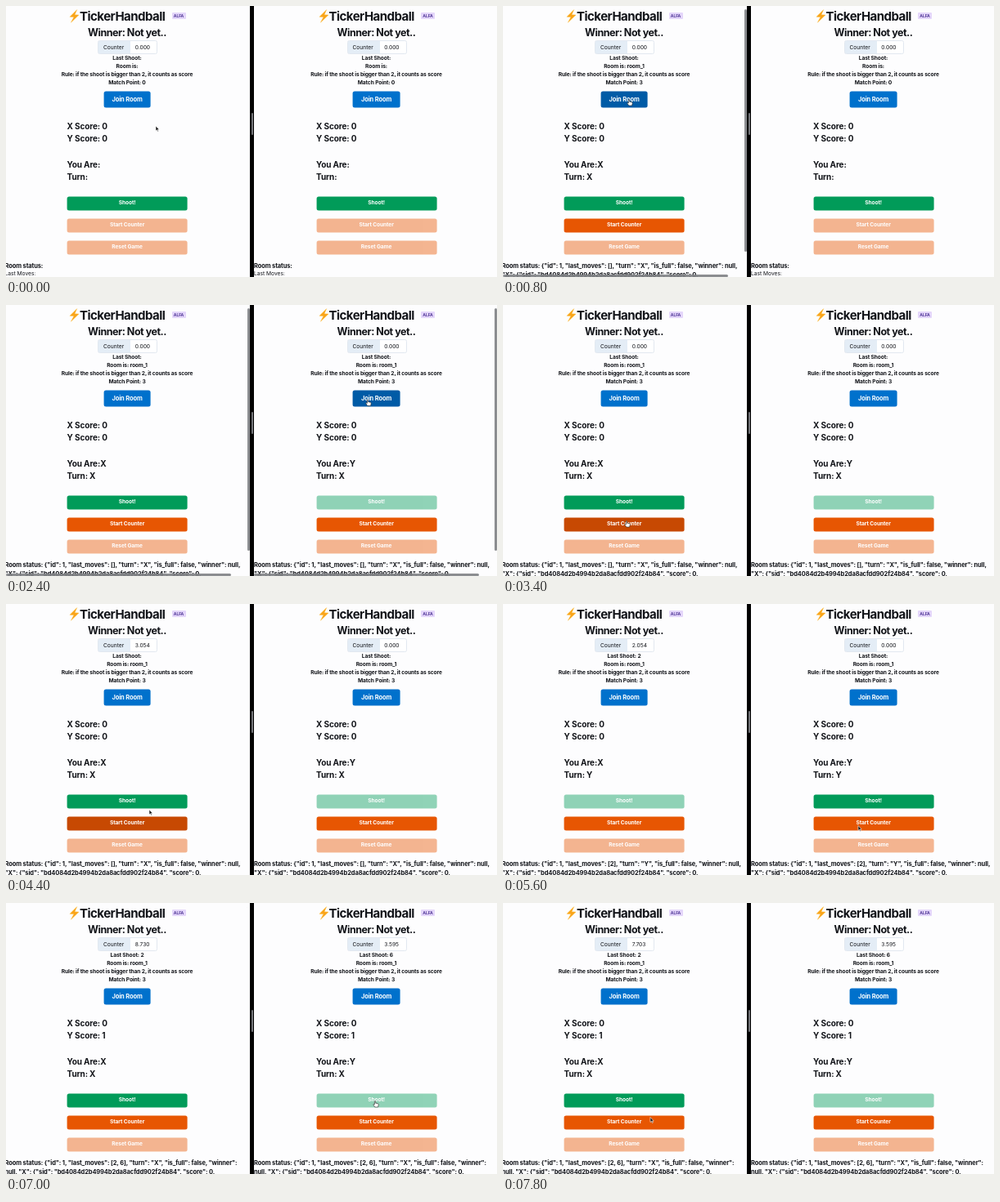
Write an HTML page that moves like this. It is 600 px wide and 332 px high and loops after 8000 ms.

```html
<!DOCTYPE html>
<html lang="en">
<head>
<meta charset="utf-8">
<title>Two-player counter game</title>
<style>
  html, body { margin: 0; width: 100%; height: 100%; overflow: hidden; }
  body { position: relative; background: #000; color: #121419; font: 700 6.667px/10px Inter, sans-serif; letter-spacing: -.018em; }
  .panel { position: absolute; top: 0; height: 332px; overflow: hidden; background: #fdfdfe; }
  .page { position: absolute; top: 0; width: 296px; height: 332px; }
  .page > * { position: absolute; white-space: pre; }
  .mid { left: 0; width: 296px; text-align: center; }
  .title { left: 90px; top: 3px; font-size: 15px; line-height: 20px; letter-spacing: -.035em; }
  .bolt { left: 77px; top: 4px; }
  .badge { left: 202.5px; top: 8px; width: 17px; height: 8px; border-radius: 1px; background: #e4d6fa;
    color: #553c9a; font-size: 5px; line-height: 8px; text-align: center; }
  .winner { top: 25px; font-size: 12.5px; line-height: 16px; letter-spacing: -.038em; }
  .counter { left: 112px; top: 42px; width: 73px; height: 16.6px; box-sizing: border-box; border: .5px solid #e2e8f0;
    border-radius: 2.5px; background: linear-gradient(90deg, #e4edf6 39px, #fff 39px); }
  .label, .value { top: 45.5px; font-weight: 400; letter-spacing: 0; }
  .label { left: 119px; }
  .value { left: 157.7px; }
  .big { left: 74.6px; font-size: 10px; line-height: 14px; }
  .btn { left: 75px; width: 147px; height: 16.7px; border-radius: 2.5px; color: #fff; line-height: 16.7px; text-align: center;
    transform: translate(-.4px, .4px); }
  .join { left: 119.7px; top: 104px; width: 57.6px; height: 20px; font-size: 7.5px; line-height: 21px; }
  .status { left: -1.5px; top: 312.6px; font-size: 7.5px; line-height: 11.25px; }
  .moves { left: -1.5px; top: 323.3px; font-weight: 400; letter-spacing: 0; }
  .bar { position: absolute; border-radius: 2px; background: #7f8184; opacity: .9; }
  .vbar { right: 0; top: 4px; width: 3px; height: 297px; }
  .hbar { left: 0; bottom: 0; width: 275px; height: 3px; }
  .grip { position: absolute; left: 300px; top: 131px; width: 2px; height: 27px; border-radius: 1px; background: #74767a; }
  #cursor { position: absolute; left: 0; top: 0; overflow: visible; }
</style>
</head>
<body>
<div class="panel" id="left" style="left:0;width:297.5px"></div>
<div class="panel" id="right" style="left:303px;width:297px"></div>
<div class="grip"></div>
<svg id="cursor" width="8" height="10" stroke-width=".6" stroke-linejoin="round">
  <path id="arrow" d="M0 0V6L1.4 4.8 2.4 7 3.3 6.6 2.4 4.5H4.2Z" fill="#111" stroke="#fff"/>
  <path id="hand" d="M-1.6-3Q-.9-4.4-.3-3V-.8L2.5-.2Q3.4 0 3.2 1.2L2.6 4H-1.3L-3.2 1Q-3.2-.2-1.6.8Z" fill="#fff" stroke="#222"/>
</svg>
<script>
const LOOP = 8000, STEP = 200;
const BLUE = ['#0071cc', '#005ba6'], GREEN = ['#019b59', '#05834a'], ORANGE = ['#e75602', '#c74902'];
const JOIN_X = 600, JOIN_Y = 2200, SHOT_X = 4800, SHOT_Y = 6800;
const RATE = 1.284 / 1000;

// time, x, y, shape
const PATH = [
  [0, 183, 147, 'arrow'], [200, 178, 141, 'arrow'], [400, 155, 118, 'hand'], [800, 155, 118, 'hand'],
  [1000, 300, 126, 'arrow'], [1200, 512, 146, 'arrow'], [1600, 465, 130, 'arrow'], [2000, 443, 119.5, 'hand'],
  [2600, 443, 119.5, 'hand'], [2800, 400, 150, 'arrow'], [3400, 152, 268, 'hand'], [4200, 152, 268, 'hand'],
  [4400, 175, 252, 'arrow'], [4600, 151, 243, 'hand'], [4800, 151, 243, 'hand'], [5000, 172, 246, 'arrow'],
  [5600, 434, 271.5, 'arrow'], [5800, 442, 269, 'hand'], [6200, 444, 268, 'hand'], [6400, 452, 246, 'hand'],
  [7200, 452, 246, 'hand'], [7400, 425, 250, 'arrow'], [7800, 180, 262.5, 'arrow'], [LOOP, 180, 262.5, 'arrow']
];

const within = (t, from, to) => t >= from && t < to;
const line = (cls, name, top) => `<div class="${cls}" data-part="${name}" style="top:${top}px"></div>`;

const TEMPLATE = `
  <div class="page">
    <svg class="bolt" width="13" height="17"><path d="M9.7.6 1 9.3 5.9 9.6 2.4 16.2 12 7 7 6.7Z" fill="#f9a51a" stroke="#fdb52b" stroke-width=".4"/></svg>
    <div class="title">TickerHandball</div><div class="badge">ALFA</div>
    <div class="mid winner">Winner: Not yet..</div>
    <div class="counter"></div><div class="label">Counter</div><div class="value" data-part="value"></div>
    ${line('mid', 'last', 59)}${line('mid', 'room', 69)}
    <div class="mid" style="top:79px">Rule: if the shoot is bigger than 2, it counts as score</div>
    ${line('mid', 'match', 89)}
    <div class="btn join" data-part="join">Join Room</div>
    ${line('big', 'scoreX', 140)}${line('big', 'scoreY', 155)}${line('big', 'you', 187)}${line('big', 'turn', 202)}
    ${line('btn', 'shoot', 233)}${line('btn', 'start', 260)}${line('btn', 'reset', 287)}
    <div class="status" data-part="status"></div><div class="moves" data-part="moves">Last Moves:</div>
  </div>
  <div class="bar vbar" data-part="vbar"></div><div class="bar hbar" data-part="hbar"></div>`;

function makePanel(id, shift) {
  const root = document.getElementById(id);
  root.innerHTML = TEMPLATE;
  root.querySelector('.page').style.left = shift + 'px';
  const parts = {};
  root.querySelectorAll('[data-part]').forEach(el => parts[el.dataset.part] = el);
  parts.shoot.textContent = 'Shoot!';
  parts.start.textContent = 'Start Counter';
  parts.reset.textContent = 'Reset Game';
  return parts;
}
const panels = { X: makePanel('left', 0), Y: makePanel('right', 1.5) };

function paint(button, colors, dark, enabled = true) {
  button.style.background = colors[+dark];
  button.style.opacity = enabled ? 1 : .43;
}

function counterValue(player, t) {
  if (player === 'X') {
    if (t < 3800) return 0;
    if (t < 4600) return 3.054 + (4400 - t) * RATE;
    return t < 6200 ? 2.054 : 9.244 - (t - 6600) * RATE;
  }
  if (t < 6000) return 0;
  return t < SHOT_Y ? 4.595 + (6600 - t) * RATE : 3.595;
}

function statusText(t, turn) {
  const moves = t < SHOT_X ? '' : t < SHOT_Y ? '2' : '2, 6';
  const gap = t < SHOT_Y ? [' ', '\n'] : ['\n', ' '];
  return `Room status: {"id": 1, "last_moves": [${moves}], "turn": "${turn}", "is_full": false, "winner":${gap[0]}null,${gap[1]}` +
    '"X": {"sid": "bd4084d2b4994b2da8acfdd902f24b84", "score": 0,';
}

function drawPanel(player, t) {
  const p = panels[player], isX = player === 'X';
  const joined = t >= (isX ? JOIN_X : JOIN_Y);
  const shot = t >= (isX ? SHOT_X : SHOT_Y);
  const turn = within(t, SHOT_X, SHOT_Y) ? 'Y' : 'X';
  const bars = within(t, JOIN_Y, 3000) || (isX && within(t, JOIN_X, 1400));

  p.value.textContent = counterValue(player, t).toFixed(3);
  p.last.textContent = 'Last Shoot:' + (shot ? (isX ? ' 2' : ' 6') : '');
  p.room.textContent = 'Room is:' + (joined ? ' room_1' : '');
  p.match.textContent = 'Match Point: ' + (joined ? 3 : 0);
  p.scoreX.textContent = 'X Score: 0';
  p.scoreY.textContent = 'Y Score: ' + (t >= SHOT_Y ? 1 : 0);
  p.you.textContent = 'You Are:' + (joined ? player : '');
  p.turn.textContent = 'Turn:' + (joined ? ' ' + turn : '');
  p.status.textContent = joined ? statusText(t, turn) : 'Room status:';
  p.moves.style.display = joined ? 'none' : '';
  p.vbar.style.display = bars ? '' : 'none';
  p.hbar.style.display = bars ? '' : 'none';

  paint(p.join, BLUE, isX ? within(t, 400, 1000) : within(t, 2000, 2800));
  paint(p.shoot, GREEN, isX ? t === 4600 : within(t, 6400, SHOT_Y), !joined || turn === player);
  paint(p.start, ORANGE, isX ? within(t, 3400, 4600) : within(t, 5800, 6400), joined);
  paint(p.reset, ORANGE, false, false);
}

function drawCursor(t) {
  const i = PATH.findIndex((key, n) => t >= key[0] && t < PATH[n + 1][0]);
  const [t0, x0, y0, shape] = PATH[i], [t1, x1, y1] = PATH[i + 1];
  const k = (t - t0) / (t1 - t0);
  document.getElementById('cursor').style.transform = `translate(${x0 + (x1 - x0) * k}px, ${y0 + (y1 - y0) * k}px)`;
  for (const name of ['arrow', 'hand']) document.getElementById(name).style.display = name === shape ? '' : 'none';
}

let shown = -1;
function tick() {
  const t = Math.floor(performance.now() % LOOP / STEP) * STEP;
  if (t !== shown) {
    shown = t;
    drawPanel('X', t);
    drawPanel('Y', t);
    drawCursor(t);
  }
  requestAnimationFrame(tick);
}
tick();
</script>
</body>
</html>
```
